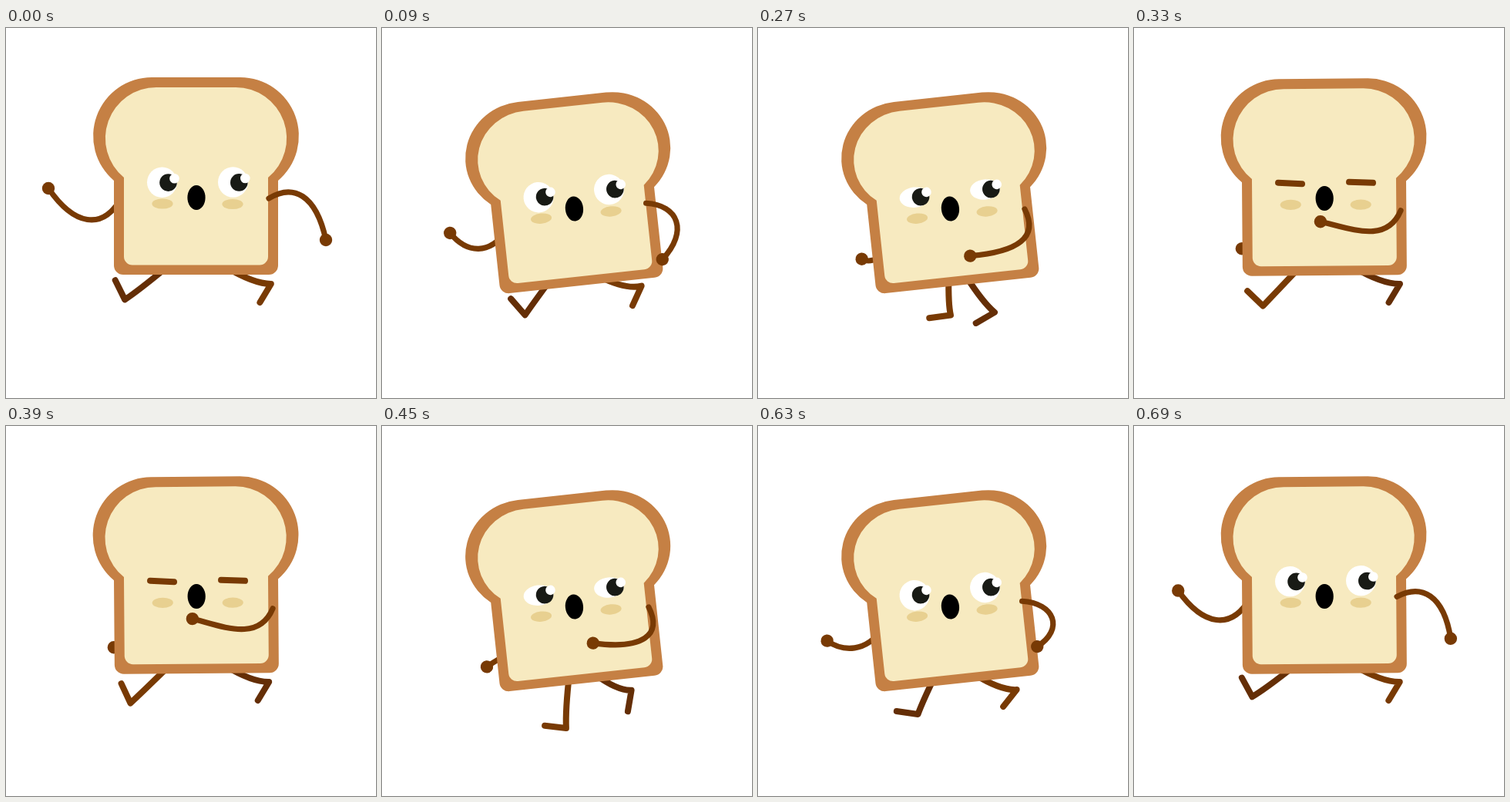
Write an HTML page that moves like this. It is 480 by 480 pixels and loops after 720 ms.

```html
<!DOCTYPE html>
<html lang="en">
<head>
<meta charset="utf-8">
<title>Running toast</title>
<style>
  html, body { margin: 0; width: 100%; height: 100%; overflow: hidden; background: #fff; }
  svg { display: block; width: 100vw; height: 100vh; }
  .limb { fill: none; stroke: #783a04; stroke-width: 7.2; stroke-linecap: round; stroke-linejoin: round; }
  .leg { stroke-width: 8; }
  #legA { stroke: #642e06; }
  .hand { fill: #783a04; }
  .lid { stroke-width: 8; }
</style>
</head>
<body>
<svg viewBox="0 0 480 480">
  <defs>
    <g id="pupil">
      <circle r="11.3" fill="#181a15"/>
      <circle cx="8" cy="-5.4" r="6.3" fill="#fff"/>
    </g>
  </defs>
  <g class="body">
    <path id="farArm" class="limb"/>
    <circle id="farHand" class="hand" r="8.2"/>
  </g>
  <path id="legA" class="limb leg"/>
  <path id="legB" class="limb leg"/>
  <g class="body">
    <g id="bread">
      <path fill="#c58044" d="M189 64H304A76 76 0 0 1 353 198V308A12 12 0 0 1 341 320H152A12 12 0 0 1 140 308V198A76 76 0 0 1 189 64Z"/>
      <path fill="#f7eac0" d="M195 77H298A66 66 0 0 1 340 194V296.5A11 11 0 0 1 329 307.5H164A11 11 0 0 1 153 296.5V194A66 66 0 0 1 195 77Z"/>
    </g>
    <g fill="#e8d090">
      <ellipse cx="203" cy="228" rx="13.6" ry="6.6"/>
      <ellipse cx="294" cy="228.5" rx="13.6" ry="6.6"/>
    </g>
    <ellipse cx="247" cy="220" rx="11.6" ry="16"/>
    <g id="eyes">
      <ellipse class="white" cx="202.5" cy="200.3" rx="19.5" fill="#fff"/>
      <ellipse class="white" cx="294.5" cy="200" rx="19.5" fill="#fff"/>
      <use class="pupil" href="#pupil" data-x="210.5" data-y="200.6"/>
      <use class="pupil" href="#pupil" data-x="302.3" data-y="200.4"/>
    </g>
    <path id="lids" class="limb lid" d="M187 199.3L218 201M279 199L310 200.3"/>
    <path id="nearArm" class="limb"/>
    <circle id="nearHand" class="hand" r="8.2"/>
  </g>
</svg>
<script>
const LOOP = 720, STEP = 30, HALF = 180;
const $ = id => document.getElementById(id);
const all = sel => [...document.querySelectorAll(sel)];
const bodies = all('.body'), whites = all('.white'), pupils = all('.pupil');
const wave = t => Math.sin(2 * Math.PI * t / LOOP);

// Arm curves (shoulder, two handles, hand) swung back, halfway and forward.
const nearArm = [
  [341, 221, 372, 202, 402, 215, 415, 275],
  [341, 226, 377, 252, 367, 288, 304, 291],
  [346, 237, 324, 281, 276, 256, 240, 247]
];
const farArm = [
  [150, 220, 125, 264, 88, 256, 55, 208],
  [161, 255, 140, 270, 119, 272, 107, 264],
  [170, 270, 162, 280, 152, 287, 140, 285]
];

// One stride, shared by both legs: time, heel x, heel y, foot angle.
const stride = [
  [-20, 153, 351, 242], [40, 162, 360, 245], [120, 246, 393, 182],
  [240, 302, 372, 153], [320, 345, 332, 121], [400, 341, 332, 121],
  [480, 320, 344, 99], [540, 249, 351, 145], [600, 252, 372, 169],
  [660, 198, 374, 193]
];

// The body and arms ease into every half bounce.
const ease = s => s * s * s * (s * (6 * s - 15) + 10);
const easedTime = t => {
  const k = Math.floor(t / HALF);
  return HALF * (k + ease(t / HALF - k));
};

// Periodic monotone cubic through the stride.
function strideAt(t) {
  const n = stride.length;
  const key = i => {
    const lap = Math.floor(i / n), [time, ...p] = stride[i - lap * n];
    return { t: time + LOOP * lap, p };
  };
  let i = n;
  while (key(i).t > t) i--;
  const [a, b, c, d] = [i - 1, i, i + 1, i + 2].map(key);
  const rate = (p, q, m) => (q.p[m] - p.p[m]) / (q.t - p.t);
  const slope = (u, v) => u * v > 0 ? 2 * u * v / (u + v) : 0;
  const h = c.t - b.t, s = (t - b.t) / h, r = 1 - s;
  return b.p.map((v, m) => {
    const mid = rate(b, c, m);
    const m0 = slope(rate(a, b, m), mid), m1 = slope(mid, rate(c, d, m));
    return v * (1 + 2 * s) * r * r + c.p[m] * s * s * (3 - 2 * s)
      + h * s * r * (m0 * r - m1 * s);
  });
}

function drawArm(name, [back, half, fore], w, drop) {
  const s = 1 - Math.abs(w - 360) / 360;
  const [x, y, ax, ay, bx, by, hx, level] = back.map((v, i) =>
    v * (1 - s) * (1 - 2 * s) + half[i] * 4 * s * (1 - s) + fore[i] * s * (2 * s - 1));
  const hy = level + drop * wave(w);
  $(name + 'Arm').setAttribute('d', `M${x} ${y}C${ax} ${ay} ${bx} ${by} ${hx} ${hy}`);
  $(name + 'Hand').setAttribute('cx', hx);
  $(name + 'Hand').setAttribute('cy', hy);
}

// Hip and knee follow the heel; lag slows one leg's step and hastens the other's.
function drawLeg(id, t, lag, dip) {
  const [x, y, deg] = strideAt((t - lag * wave(t) + LOOP) % LOOP);
  const hipX = 247 + 0.4 * (x - 249), hipY = 310 + 25 * dip;
  const kneeX = (hipX + x) / 2 + 0.1 * (x - 270), kneeY = (hipY + y) / 2 + 11;
  const a = deg * Math.PI / 180;
  $(id).setAttribute('d', `M${hipX} ${hipY}Q${kneeX} ${kneeY} ${x} ${y}l${28 * Math.cos(a)} ${28 * Math.sin(a)}`);
}

function drawEyes(t) {
  const open = Math.min(1, Math.max(0, (Math.abs(t - 360) - 30) / 90));
  $('eyes').style.display = open ? '' : 'none';
  $('lids').style.display = open ? 'none' : '';
  whites.forEach(e => e.setAttribute('ry', 19.7 * open));
  pupils.forEach(e => e.setAttribute('transform',
    `translate(${e.dataset.x} ${e.dataset.y}) scale(1 ${Math.min(1, open * 1.6)})`));
}

function draw(t) {
  const w = easedTime(t);
  const dip = 1 - Math.abs(w % 360 - HALF) / HALF;
  bodies.forEach(g => g.setAttribute('transform',
    `translate(${4.9 * dip} ${29 * dip}) rotate(${-12.3 * dip} 247 220)`));
  $('bread').setAttribute('transform',
    `translate(0 320) scale(1 ${1 - 0.081 * dip}) translate(0 -320)`);
  drawArm('near', nearArm, w, 10);
  drawArm('far', farArm, w, -9);
  drawLeg('legA', t, 30, dip);
  drawLeg('legB', (t + LOOP / 2) % LOOP, -30, dip);
  drawEyes(t);
}

const start = performance.now();
function tick() {
  const t = (performance.now() - start) % LOOP;
  draw(Math.floor(t / STEP) * STEP);
  requestAnimationFrame(tick);
}
tick();
</script>
</body>
</html>
```
